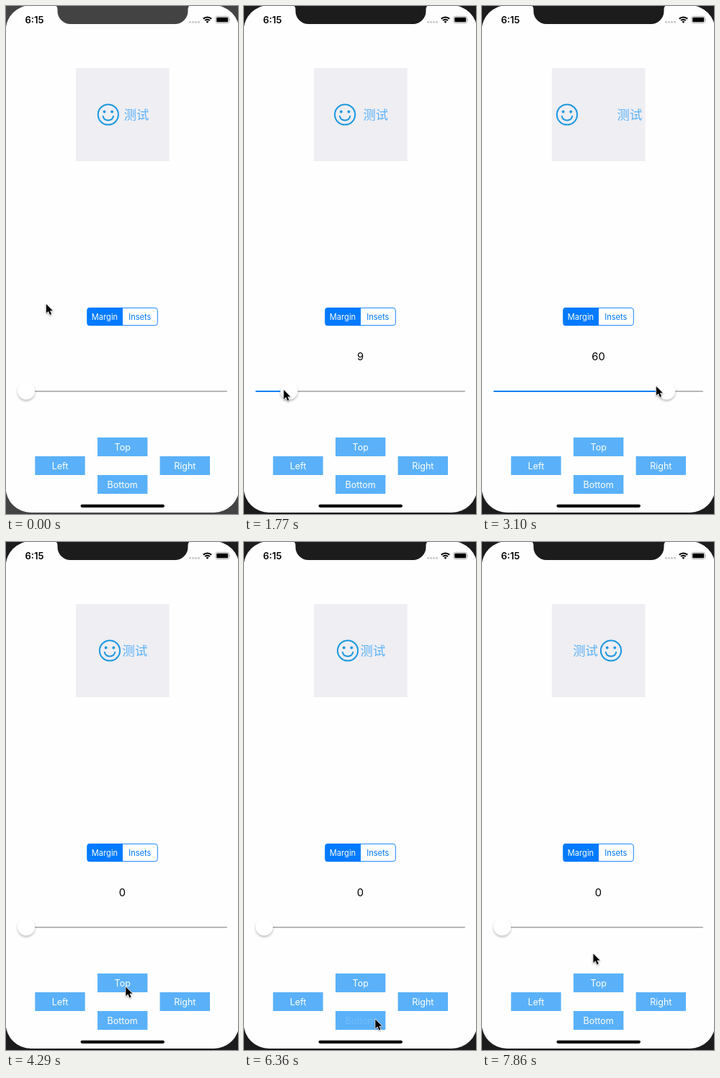
These frames come from a looping animation (322 by 704 pixels, 8000 ms). An HTML page:

```html
<!DOCTYPE html>
<html lang="en">
<head>
<meta charset="utf-8">
<title>Button layout demo</title>
<style>
  html, body { margin: 0; height: 100%; overflow: hidden; background: #fff; }
  svg { display: block; width: 100vw; height: 100vh; }
  text { font-family: Inter, "Noto Sans", sans-serif; text-anchor: middle; }
  #caption { font: 300 17.3px "Noto Sans CJK SC", "Noto Sans CJK", sans-serif; fill: #5ab1f9; }
  .segment { font-size: 11.1px; }
  .button { font-size: 12.5px; fill: #fff; }
  #thumb { filter: drop-shadow(0 2.4px 1.8px rgba(0, 0, 0, .25)); }
  #cursor { filter: drop-shadow(0 1px 1px rgba(0, 0, 0, .35)); }
</style>
</head>
<body>
<svg viewBox="0 0 322 704">
  <rect class="bezel" width="322" height="704"/>
  <rect x="-.4" y="-1" width="324" height="703" rx="35" fill="#fefefe"/>
  <path class="bezel" d="M66 -1Q71.500 -1 71.500 4.500V7A18 18 0 0 0 89.500 25H234.500A18 18 0 0 0 252.500 7V4.500Q252.500 -1 258 -1Z"/>

  <text x="39.500" y="23.500" font-size="13" font-weight="600">6:15</text>
  <path d="M255.500 22.300H268" stroke="#c6c6c8" stroke-width="3" stroke-linecap="round" stroke-dasharray="0 4"/>
  <path d="M273.800 17.800A8.100 8.100 0 0 1 285.200 17.800M276.100 20.100A4.800 4.800 0 0 1 282.900 20.100"
        fill="none" stroke="#000" stroke-width="2.100"/>
  <path d="M279.500 23.700l-1.900 -1.900a2.700 2.700 0 0 1 3.800 0z"/>
  <rect x="290.900" y="14.400" width="18.600" height="9.200" rx="2.400" fill="none" stroke="#a5a5a5" stroke-width=".9"/>
  <rect x="292.200" y="15.700" width="16" height="6.600" rx="1.300"/>
  <path d="M310.500 17.300q1.500 1.700 0 3.400z" fill="#a5a5a5"/>

  <rect x="97" y="86" width="129.600" height="129" fill="#eeeef3"/>
  <g id="smiley" fill="none" stroke="#1c98df" stroke-width="2">
    <circle r="14.100"/>
    <path d="M-7.200 2.300A7.400 7.400 0 0 0 7.200 2.300" stroke-linecap="round"/>
    <g fill="#1c98df" stroke="none"><circle cx="-5.300" cy="-4" r="1.900"/><circle cx="5.300" cy="-4" r="1.900"/></g>
  </g>
  <text id="caption">测试</text>

  <path d="M162 418H116a3.500 3.500 0 0 0 -3.500 3.500v18a3.500 3.500 0 0 0 3.500 3.500h46z" fill="#007aff"/>
  <rect x="112.900" y="418.400" width="97.400" height="24.200" rx="3.400" fill="none" stroke="#007aff" stroke-width=".9"/>
  <text class="segment" x="137" y="434.500" fill="#fff">Margin</text>
  <text class="segment" x="185.800" y="434.500" fill="#007aff">Insets</text>

  <text id="value" x="161.500" y="491.200" font-size="14.700"></text>
  <rect x="16" y="533" width="291" height="1.900" rx=".9" fill="#b8b8b9"/>
  <rect id="filled" x="16" y="533" height="1.900" rx=".9" fill="#0f80f5"/>
  <circle id="thumb" cy="533.500" r="12.100" fill="#fff"/>

  <g id="buttons"></g>
  <rect x="103.500" y="690.700" width="116.500" height="4.300" rx="2.150"/>
  <path id="cursor" d="M0 0V12.800L3 10L5.200 15L7.300 14.100L5.200 9.300H9.200Z"
        stroke="#fff" stroke-width="1.500" stroke-linejoin="round" paint-order="stroke"/>
</svg>

<script>
const LOOP = 8000, STEPS = 54, STEP_MS = LOOP / STEPS;
const DRAG = { start: 9, peak: 19, turn: 20, end: 24.2, max: 70 };  // in steps
const $ = id => document.getElementById(id);

// Buttons in click order; spot is where the cursor rests
const buttons = [
  { label: 'Top', x: 127, y: 598, press: 31, spot: [166.3, 616.5] },
  { label: 'Left', x: 40.3, y: 624, press: 37, spot: [102.3, 631] },
  { label: 'Bottom', x: 127, y: 650, press: 43, spot: [182.3, 661.5] },
  { label: 'Right', x: 213.6, y: 624, press: 47, spot: [243, 639.5] }
];
$('buttons').innerHTML = buttons.map(({ label, x, y }) =>
  `<rect x="${x}" y="${y}" width="69.400" height="26" fill="#5ab1f9"/>
   <text class="button" x="${x + 34.7}" y="${y + 17.6}">${label}</text>`).join('');
const buttonTexts = document.querySelectorAll('.button');

const stops = [
  { arrive: 0, leave: 0, spot: [55.8, 413] },
  { arrive: 8, leave: DRAG.start, spot: [27, 533] },
  { arrive: 24, leave: 24, spot: [27, 533] },
  ...buttons.map(({ press, spot }) => ({ arrive: press - 2, leave: press + 1, spot })),
  { arrive: 53, leave: STEPS, spot: [154.5, 570.5] }
];

const clamp = v => Math.max(0, Math.min(1, v));
const progress = (from, to, step) => clamp((step - from) / (to - from));
const smooth = p => p * p * (3 - 2 * p);

function sliderValue(step) {
  const rise = progress(DRAG.start, DRAG.peak, step) ** 1.7;
  const fall = smooth(progress(DRAG.turn, DRAG.end, step));
  return DRAG.max * rise * (1 - fall);
}
const thumbPosition = step => 28.1 + 3.804 * sliderValue(step);

function cursorPosition(step) {
  if (step > DRAG.start && step < DRAG.end - 1) {
    // The thumb trails the cursor slightly.
    return [thumbPosition(step + 0.08) - 8.8, 533 - sliderValue(step) * 0.1];
  }
  const i = stops.findIndex(stop => step <= stop.leave);
  const to = stops[i], from = stops[i - 1] || to;
  const p = step < to.arrive ? smooth(progress(from.leave, to.arrive, step)) : 1;
  return to.spot.map((v, axis) => from.spot[axis] + (v - from.spot[axis]) * p);
}

// Centres of the smiley and its caption
function arrange(layout, margin) {
  const gap = margin * 0.433, cx = 161.5, cy = 150.5;
  return {
    Left: [cx - 17.5 - gap, cy, cx + 17.4 + gap, cy],
    Right: [cx + 17.5 + gap, cy, cx - 18 - gap, cy],
    Top: [cx, cy - 17.4 - gap, cx, cy + 10 + gap],
    Bottom: [cx, cy + 17.4 + gap, cx, cy - 10 - gap]
  }[layout];
}

// Titles dim while pressed, then fade back in
function titleOpacity(press, step) {
  if (step < press) return 1;
  return step === press ? 0.15 : Math.min(1, 0.05 + 0.25 * (step - press));
}

const moveTo = (node, x, y) => node.setAttribute('transform', `translate(${x} ${y})`);

function draw(step) {
  const active = step >= DRAG.start;
  const value = Math.round(sliderValue(step));
  const thumbX = thumbPosition(step);
  const clicked = buttons.filter(({ press }) => step > press).pop();
  const [iconX, iconY, textX, textY] = arrange(clicked ? clicked.label : 'Left', active ? value : 5);

  document.querySelectorAll('.bezel').forEach(node => node.setAttribute('fill', active ? '#1c1c1d' : '#434344'));
  moveTo($('smiley'), iconX, iconY);
  moveTo($('caption'), textX, textY + 6.3);
  $('value').textContent = active ? value : '';
  $('filled').setAttribute('width', thumbX - 16);
  $('thumb').setAttribute('cx', thumbX);
  buttons.forEach(({ press }, i) => buttonTexts[i].setAttribute('fill-opacity', titleOpacity(press, step)));
  moveTo($('cursor'), ...cursorPosition(step));
}

const start = performance.now();
function tick() {
  const time = (performance.now() - start) % LOOP;
  // The picture advances in discrete steps, each a touch early.
  draw(Math.min(STEPS - 1, Math.floor((time + 14) / STEP_MS)));
  requestAnimationFrame(tick);
}
tick();
</script>
</body>
</html>
```
